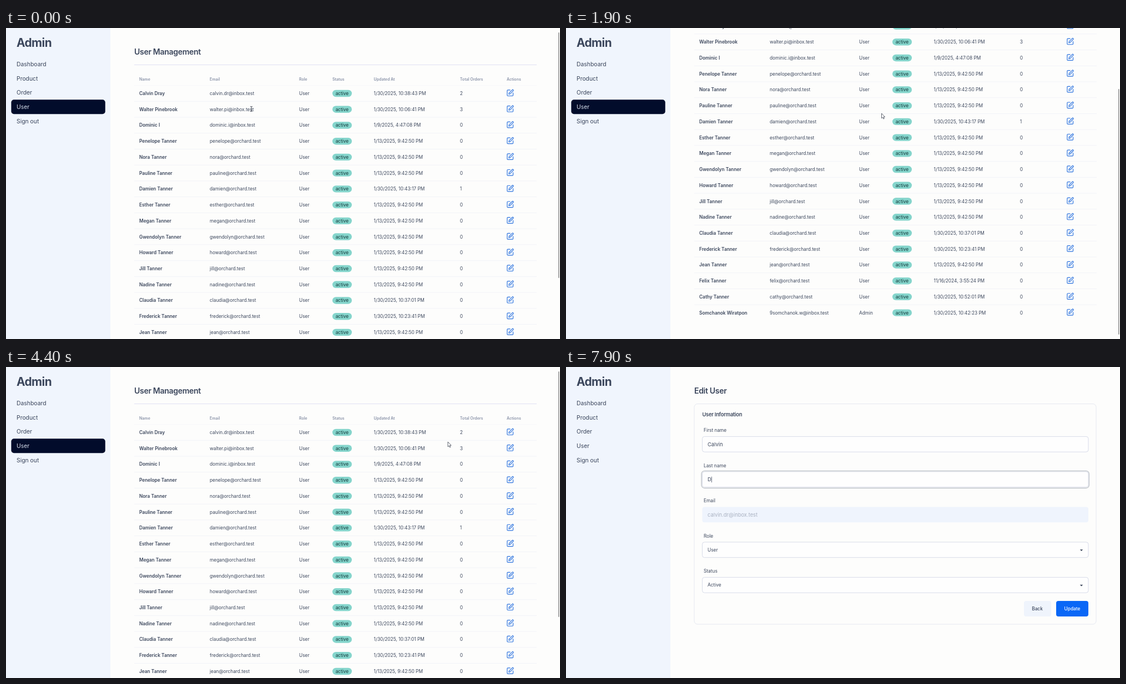
Animation of 998 by 561 pixels, one loop 8000 ms. Source, as an HTML page:

```html
<!DOCTYPE html>
<html lang="en">
<head>
<meta charset="utf-8">
<title>User admin</title>
<style>
  html, body { margin: 0; width: 100%; height: 100%; overflow: hidden; background: #fdfdfc; }
  svg { display: block; width: 100vw; height: 100vh; }
  text { font: 8.32px Inter, "Open Sans", sans-serif; fill: #3b465c; }
  .brand { font-size: 20.8px; font-weight: 700; letter-spacing: -.025em; }
  .nav { font-size: 10.4px; }
  .title { font-size: 14.1px; font-weight: 600; letter-spacing: -.025em; }
  .section { font-size: 9.3px; font-weight: 600; letter-spacing: -.025em; }
  .head { font-size: 7px; font-weight: 600; fill: #8a93a8; }
  .name { font-weight: 600; }
  .badge { fill: #12383a; }
  .input { font-size: 9.36px; }
  .muted { fill: #a9b1c1; }
  .button { font-weight: 500; text-anchor: middle; }
  .light { fill: #fff; }
  .pale { fill: #d6dcea; }
  .icon { fill: none; stroke: #2b72de; stroke-width: 2; stroke-linecap: round; stroke-linejoin: round; }
  .pointer { fill: #fff; stroke: #3c4250; stroke-width: .8; stroke-linejoin: round; }
  #beam { fill: none; stroke: #2c3240; stroke-width: .9; }
</style>
</head>
<body>
<svg id="stage" viewBox="0 0 998 561"></svg>
<script>
const LOOP = 8000, STEP = 100;
const MAX_SCROLL = 121.5, ROW = 28.73;
const PAGE_SWITCH = 5600, FOCUS = 7000;
const LAST_NAME = 'Dray';

// name | email | date | orders | role
const USUAL = '1/13/2025, 9:42:50 PM';
const people = `Calvin Dray|calvin.dr@inbox.test|1/30/2025, 10:38:43 PM|2
Walter Pinebrook|walter.pi@inbox.test|1/30/2025, 10:06:41 PM|3
Dominic I|dominic.i@inbox.test|1/9/2025, 4:47:08 PM
Penelope Tanner
Nora Tanner
Pauline Tanner
Damien Tanner||1/30/2025, 10:43:17 PM|1
Esther Tanner
Megan Tanner
Gwendolyn Tanner
Howard Tanner
Jill Tanner
Nadine Tanner
Claudia Tanner||1/30/2025, 10:37:01 PM
Frederick Tanner||1/30/2025, 10:23:41 PM
Jean Tanner
Felix Tanner||11/16/2024, 3:55:24 PM
Cathy Tanner||1/30/2025, 10:52:01 PM
Somchanok Wiratpon|9somchanok.w@inbox.test|1/30/2025, 10:42:23 PM|0|Admin`
  .split('\n').map(line => line.split('|'));

const text = (x, y, str, cls = '', extra = '') =>
  `<text x="${x}" y="${y}" class="${cls}" ${extra}>${str}</text>`;
const box = (x, y, w, h, r, fill, stroke = 'none', extra = '') =>
  `<rect x="${x}" y="${y}" width="${w}" height="${h}" rx="${r}" fill="${fill}" stroke="${stroke}" ${extra}/>`;
const rule = (y, color) => `<path d="M231 ${y}H956" stroke="${color}"/>`;

function tableRow([name, email, date, orders, role], i) {
  const mid = 118 + i * ROW, base = mid + 3;
  const address = email || name.split(' ')[0].toLowerCase() + '@orchard.test';
  return text(240, base, name, 'name') + text(367, base, address) +
    text(528, base, role || 'User') +
    box(588, mid - 6.2, 35, 12.4, 6.2, '#85d5cc') + text(593.7, base, 'active', 'badge') +
    text(662.5, base, date || USUAL) + text(817.8, base, orders || 0) +
    `<g class="icon" transform="translate(901.1 ${mid - 7.9}) scale(.59)">
      <path d="M12 3H5a2 2 0 0 0-2 2v14a2 2 0 0 0 2 2h14a2 2 0 0 0 2-2v-7"/>
      <path d="M18.4 2.6a2.1 2.1 0 1 1 3 3L12 15l-4 1 1-4Z"/></g>` +
    (i < people.length - 1 ? rule(mid + 14.3, '#f2f3f8') : '');
}

function listPage() {
  const heads = [[240, 'Name'], [367, 'Email'], [528, 'Role'], [588, 'Status'],
    [662.5, 'Updated At'], [817.8, 'Total Orders'], [902, 'Actions']];
  return text(231, 47.5, 'User Management', 'title') + rule(66.4, '#dfdff4') +
    heads.map(([x, label]) => text(x, 94.6, label, 'head')).join('') +
    rule(103.7, '#f7f7fa') + people.map(tableRow).join('');
}

function editPage() {
  const fields = [['First name', 'Calvin'], ['Last name', LAST_NAME],
    ['Email', people[0][1]], ['Role', 'User'], ['Status', 'Active']];
  return text(231, 47.5, 'Edit User', 'title') +
    box(231, 66.5, 724, 397.5, 6, 'none', '#e6e9f1') +
    text(245.5, 88.8, 'User Information', 'section') +
    fields.map(([label, value], i) => {
      const y = 125.4 + i * 63.5, muted = i === 2, select = i > 2;
      return text(248, y - 8, label) +
        box(245.5, y, 695.5, 27.8, 4, muted ? '#eff4fd' : '#fefefe', muted ? 'none' : '#d8dce9') +
        text(255, y + (select ? 16.9 : 17.4), value, select ? '' : muted ? 'input muted' : 'input',
          i === 1 ? 'id="last"' : '') +
        (select ? `<path d="M925.8 ${y + 13.3}h5.4l-2.7 2.8Z" fill="#343f54"/>` : '');
    }).join('') +
    `<g id="focus">${box(244, 187.3, 698.4, 31.2, 5.5, 'none', '#bfc4c9', 'stroke-width="1.3"')}
      <path id="caret" d="M0 197.8v10.4" stroke="#3b465c" stroke-width=".8"/></g>` +
    box(825, 422, 49, 28, 4, '#eff4fc') + text(849, 438.6, 'Back', 'button') +
    box(883, 422, 58, 28, 4, '#0a67f6') + text(912, 438.6, 'Update', 'button light');
}

function sidebar() {
  const items = ['Dashboard', 'Product', 'Order', 'User', 'Sign out'];
  return box(0, 0, 188, 561, 0, '#f0f5fd') + text(19, 33.6, 'Admin', 'brand') +
    box(9.4, 129.3, 169.4, 25.9, 5, '#020c2b', 'none', 'id="active"') +
    items.map((label, i) => text(19, 68.6 + i * 25.9, label, 'nav', `id="nav${i}"`)).join('');
}

stage.innerHTML = `<g id="list">${listPage()}</g><g id="edit">${editPage()}</g>${sidebar()}
  <rect id="bar" x="995" y="8" width="1.5" height="443" rx=".7" fill="#8b8b8b"/>
  <path id="arrow" class="pointer" d="M0 0V8.8L2 7 3.4 10 4.8 9.4 3.5 6.4H6Z"/>
  <path id="hand" class="pointer" d="M-1 .5a1 1 0 0 1 2 0V4l3 .6q1.2.3 1 1.5L4.4 10H-.2L-2.8 6.6q.3-1 1.8-.2Z"/>
  <path id="beam" d="M-2-4.5Q0-4.5 0-3.5 0-4.5 2-4.5M0-3.5V3.5M-2 4.5Q0 4.5 0 3.5 0 4.5 2 4.5"/>`;

const el = id => document.getElementById(id);
const show = (id, on) => { el(id).style.display = on ? '' : 'none'; };

// time, x, y, shape shown from this point on
const mouse = [
  [0, 442, 146, 'beam'], [700, 442, 146, 'beam'], [1000, 470, 146, 'arrow'],
  [1700, 565.5, 148, 'arrow'], [1900, 568.5, 154, 'arrow'], [2400, 569, 155, 'arrow'],
  [3900, 569, 155, 'arrow'], [4400, 796, 135, 'arrow'], [4900, 909, 114, 'hand'],
  [5500, 909, 114, 'hand'], [5600, 900, 115, 'arrow'], [6000, 788, 117, 'arrow'],
  [6300, 640, 160, 'arrow'], [6700, 300, 200, 'beam'], [7200, 282, 203, 'beam'],
  [7300, 282, 203, ''], [LOOP, 282, 203, '']
];

function mouseAt(t) {
  const i = mouse.findIndex(key => key[0] > t);
  const a = mouse[i - 1], b = mouse[i], u = (t - a[0]) / (b[0] - a[0]);
  return [a[1] + (b[1] - a[1]) * u, a[2] + (b[2] - a[2]) * u, a[3]];
}

function scrollAt(t) {
  if (t < 1800) return 0;
  if (t < 1900) return 86;
  const u = Math.min(1, Math.max(0, (t - 3210) / 690));
  return MAX_SCROLL * (1 - u * u * (3 - 2 * u));
}

function draw(t) {
  const editing = t >= PAGE_SWITCH, scroll = scrollAt(t);
  show('list', !editing);
  show('edit', editing);
  show('active', !editing);
  show('bar', !editing);
  el('nav3').classList.toggle('pale', !editing);
  el('list').setAttribute('transform', `translate(0 ${-scroll})`);
  el('bar').setAttribute('y', 8 + scroll * .84);

  const erased = [7400, 7500, 7700].filter(at => t >= at).length;
  const last = el('last');
  last.textContent = LAST_NAME.slice(0, LAST_NAME.length - erased);
  show('focus', t >= FOCUS);
  if (t >= FOCUS) {
    el('caret').setAttribute('transform', `translate(${255.6 + last.getComputedTextLength()} 0)`);
  }

  const [x, y, shape] = mouseAt(t);
  for (const id of ['arrow', 'hand', 'beam']) {
    show(id, id === shape);
    el(id).setAttribute('transform', `translate(${x} ${y})`);
  }
}

const start = performance.now();
function tick() {
  const t = (performance.now() - start) % LOOP;
  draw(Math.floor(t / STEP) * STEP);
  requestAnimationFrame(tick);
}
tick();
</script>
</body>
</html>
```
